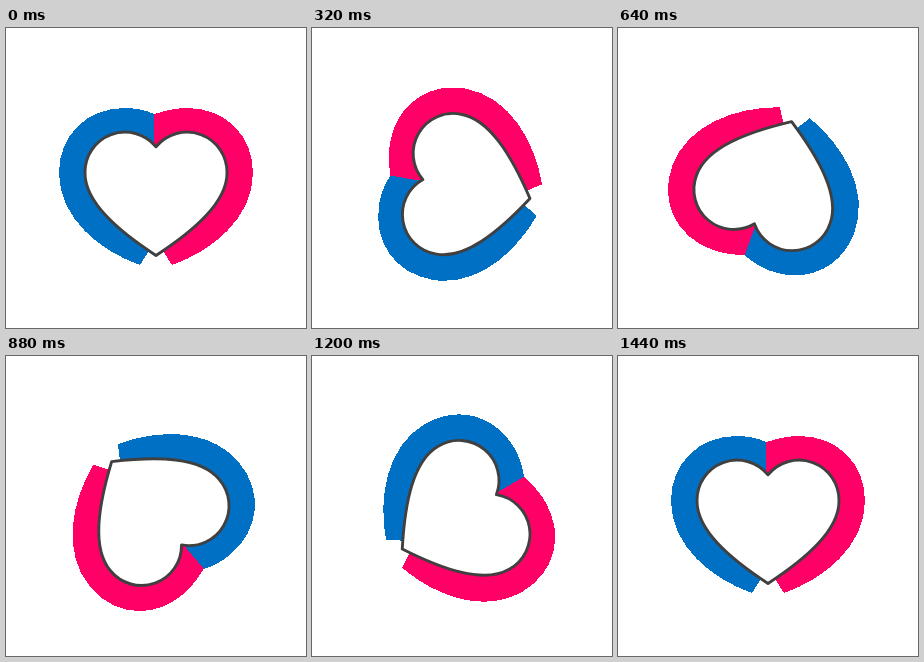
Recreate the animation shown at these times as an HTML page. Size 300 px wide and 300 px high, loop 1.52 s.

```html
<!DOCTYPE html>
<html lang="en">
<head>
<meta charset="utf-8">
<title>Turning heart</title>
<style>
  html, body { margin: 0; width: 100%; height: 100%; overflow: hidden; background: #fff; }
  svg { display: block; width: 100%; height: 100%; }
</style>
</head>
<body>
<svg viewBox="0 0 300 300">
  <g id="heart">
    <g shape-rendering="crispEdges">
      <path id="left" fill="#0070c5"/>
      <path id="right" fill="#ff0066" transform="translate(300) scale(-1 1)"/>
    </g>
    <path fill="#fff" stroke="#404040" stroke-width="2.9" stroke-linejoin="round"
      d="M150 118.8A40 40 0 0 0 79 145C79 174 111 202 150 227.5C189 202 221 174 221 145A40 40 0 0 0 150 118.8Z"/>
  </g>
</svg>
<script>
  const STEP = 80, LOOP = 1520, TURN = 20;
  const $ = id => document.getElementById(id);

  // One half of the band; edge is where it meets the other half.
  const band = edge => `M${edge} 86C139 82 129 80 119 80C81 80 53 107 53 145` +
    `C53 190 94 223 134 237L148 215L${edge} 118Z`;

  $('left').setAttribute('d', band(148.4));
  $('right').setAttribute('d', band(151.6));

  function draw(ms) {
    const step = Math.floor((ms % LOOP) / STEP);
    $('heart').setAttribute('transform', `rotate(${-step * TURN} 150 158.5)`);
  }

  let start;
  function tick(now) {
    start ??= now;
    draw(now - start);
    requestAnimationFrame(tick);
  }
  draw(0);
  requestAnimationFrame(tick);
</script>
</body>
</html>
```
